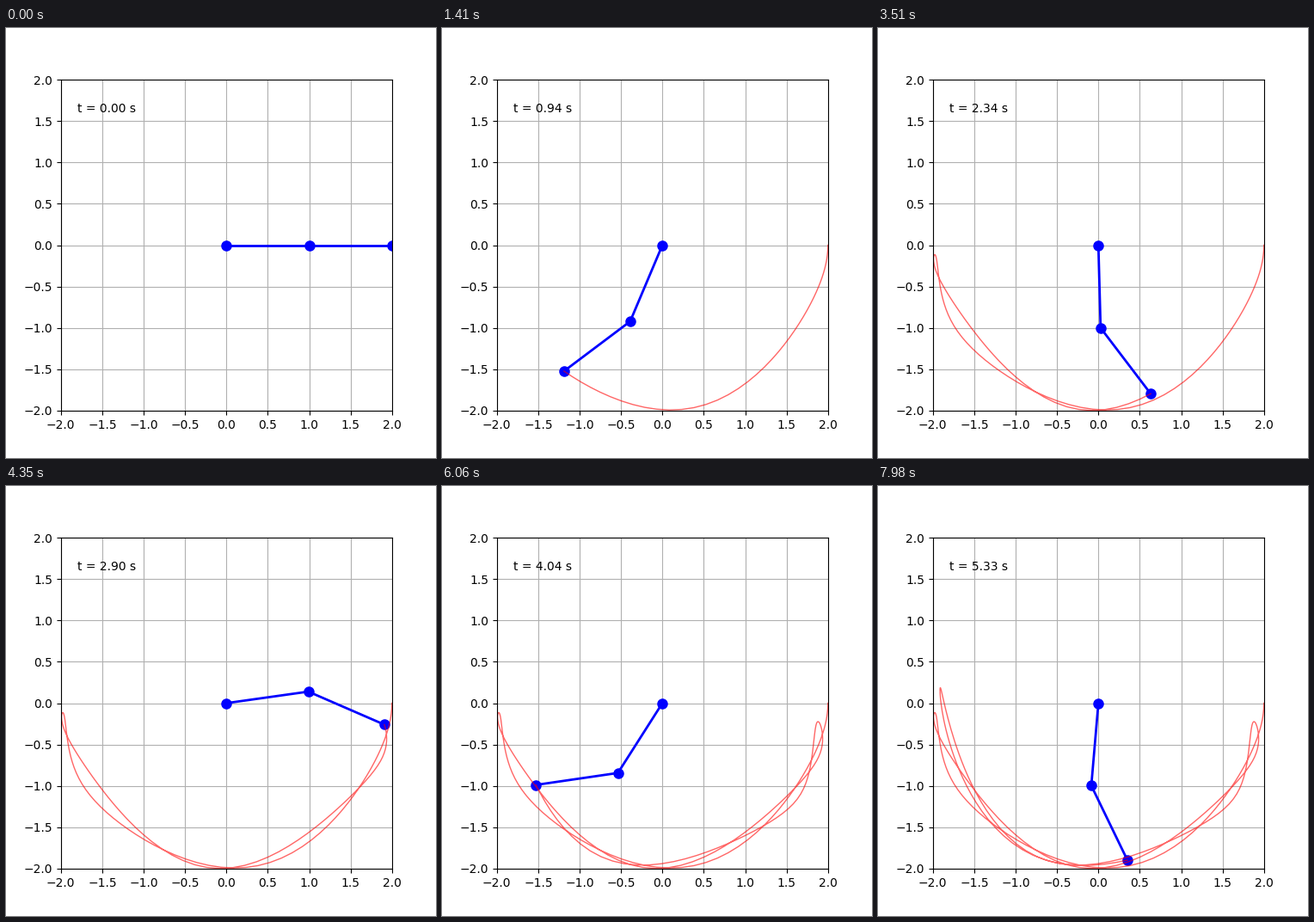
A matplotlib script that plays this animation: 500 by 500 pixels, repeating every 8 s.

```python
import numpy as np
import matplotlib.pyplot as plt
from matplotlib.animation import FuncAnimation

G = 9.81
L1 = L2 = 1.0
M1 = M2 = 1.0
FRAMES = 267
LOOP_MS = 8000
SUBSTEPS = 8


def deriv(state):
    a, wa, b, wb = state
    d = a - b
    s, c = np.sin(d), np.cos(d)
    den = M1 + M2 * s * s
    acc_a = (-M2 * c * (L1 * wa**2 * s - G * np.sin(b))
             - M2 * L2 * wb**2 * s - (M1 + M2) * G * np.sin(a)) / (L1 * den)
    acc_b = (L1 * wa**2 * s - G * np.sin(b) - L1 * c * acc_a) / L2
    return np.array([wa, acc_a, wb, acc_b])


def rk4(state, h):
    k1 = deriv(state)
    k2 = deriv(state + h / 2 * k1)
    k3 = deriv(state + h / 2 * k2)
    k4 = deriv(state + h * k3)
    return state + h / 6 * (k1 + 2 * k2 + 2 * k3 + k4)


def simulate(times):
    state = np.array([np.pi / 2, 0.0, np.pi / 2, 0.0])
    path = [state]
    h = (times[1] - times[0]) / SUBSTEPS
    for _ in times[1:]:
        for _ in range(SUBSTEPS):
            state = rk4(state, h)
        path.append(state)
    return np.array(path)


times = np.linspace(0, 20, 1000)[:FRAMES]
path = simulate(times)
x1, y1 = L1 * np.sin(path[:, 0]), -L1 * np.cos(path[:, 0])
x2, y2 = x1 + L2 * np.sin(path[:, 2]), y1 - L2 * np.cos(path[:, 2])

fig, ax = plt.subplots(figsize=(5, 5), dpi=100)
ax.set_xlim(-2, 2)
ax.set_ylim(-2, 2)
ax.set_aspect("equal")
ax.grid()

rods, = ax.plot([], [], "o-", color="blue", lw=2, markersize=8)
trace, = ax.plot([], [], "-", color="red", lw=1, alpha=0.6)
clock = ax.text(0.05, 0.9, "", transform=ax.transAxes)


def update(i):
    rods.set_data([0, x1[i], x2[i]], [0, y1[i], y2[i]])
    trace.set_data(x2[:i + 1], y2[:i + 1])
    clock.set_text(f"t = {times[i]:.2f} s")
    return rods, trace, clock


anim = FuncAnimation(fig, update, frames=FRAMES, interval=LOOP_MS / FRAMES,
                     repeat=True, repeat_delay=0, blit=True)
plt.show()
```
